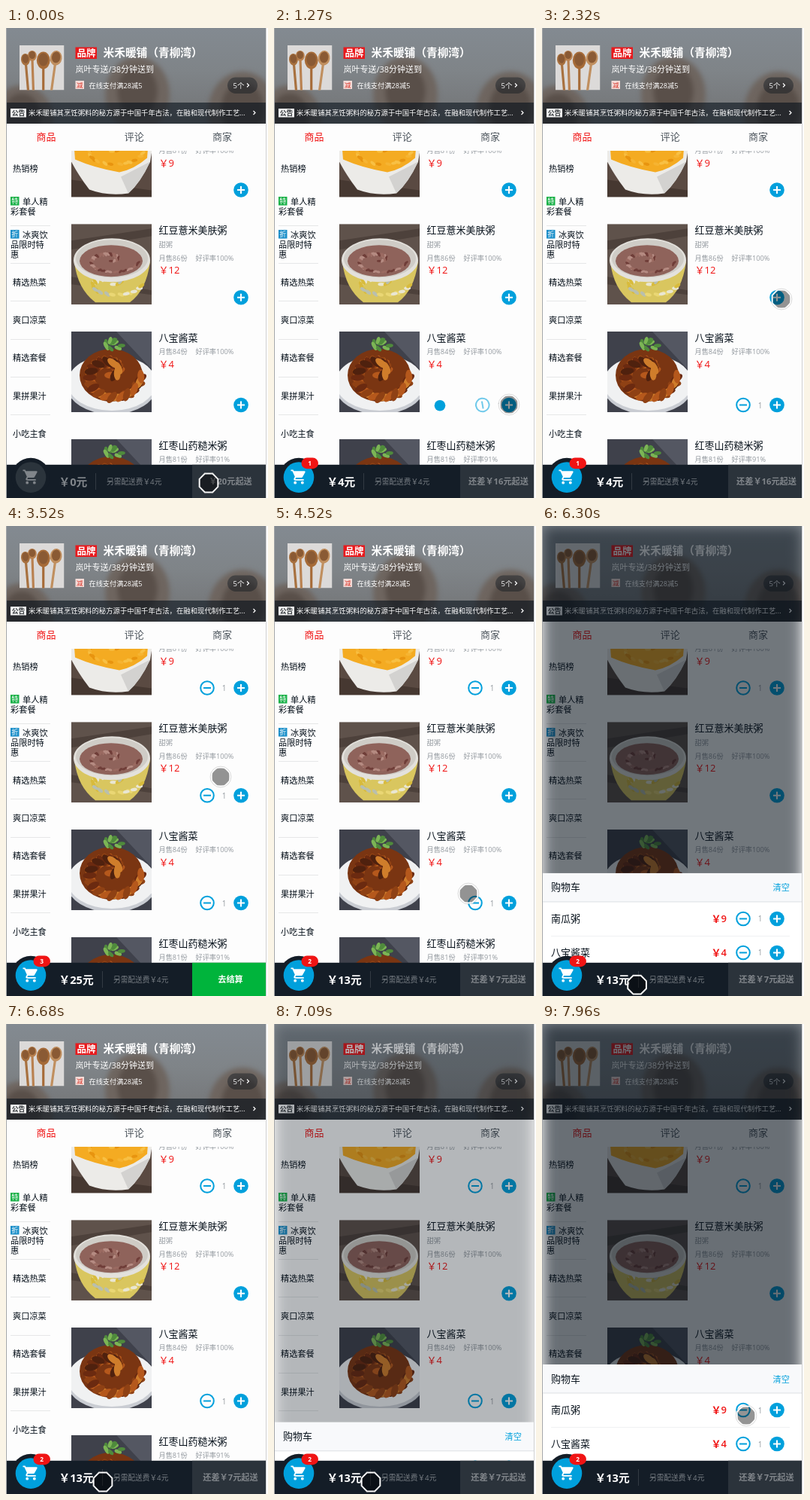
An HTML page for the animation above (8 s loop, 349 by 624 pixels).

```html
<!DOCTYPE html>
<html lang="zh-CN">
<head>
<meta charset="utf-8">
<title>点餐</title>
<style>
html, body { margin: 0; width: 100%; height: 100%; overflow: hidden; background: #fff; }
svg { display: block; }
#stage { position: absolute; left: 0; top: 0; }
text { font-family: "Open Sans", "Noto Sans CJK SC", "Noto Sans CJK", sans-serif; white-space: pre; }
#shade { filter: blur(9.2px); }
#glow { filter: blur(3px); }
</style>
</head>
<body>
<svg id="stage" width="349" height="624" viewBox="0 0 349 624"></svg>
<script>
const BLUE = '#00a0dc', RED = '#f01414', INK = '#07111b', GREY = '#93999f', BAR = '#141d27';

// Markup helpers
const text = (x, y, size, fill, str, more = '') =>
  `<text x="${x}" y="${y}" font-size="${size}" fill="${fill}" ${more}>${str}</text>`;
const rect = (x, y, w, h, fill, more = '') =>
  `<rect x="${x}" y="${y}" width="${w}" height="${h}" fill="${fill}" ${more}/>`;
const oval = (x, y, rx, ry, fill, more = '') =>
  `<ellipse cx="${x}" cy="${y}" rx="${rx}" ry="${ry}" fill="${fill}" ${more}/>`;
const path = (d, fill, more = '') => `<path d="${d}" fill="${fill}" ${more}/>`;
const BOLD = 'font-weight="700" ', MEDIUM = 'font-weight="500" ', MID = 'text-anchor="middle" ';

const chevron = (x, y) => path(`M${x} ${y - 2.5}l2.5 2.5l-2.5 2.5`, 'none', 'stroke="#fff" stroke-width="1.2"');
const plus = y => oval(313, y, 9.8, 9.8, BLUE) +
  path(`M308 ${y}h10M313 ${y - 5}v10`, 'none', 'stroke="#fff" stroke-width="2"');
const minus = `<g class="minus">${oval(0, 0, 8.8, 8.8, 'none', `stroke="${BLUE}" stroke-width="2"`)}${
  path('M-5 0h10', 'none', `stroke="${BLUE}" stroke-width="2"`)}</g>`;
const stepper = (y, id = '') => `<g id="${id}"><g transform="translate(268 ${y})">${minus}</g>${
  text(290.5, y + 4, 10, GREY, '1', MID)}</g>` + plus(y);

// Even, shuffled scatter of small ovals
const scatter = (n, cx, cy, rx, ry, size, colors) => Array.from({ length: n }, (_, i) => {
  const a = i * 2.4, r = Math.sqrt(i * .618 % 1);
  const x = cx + rx * r * Math.cos(a), y = cy + ry * r * Math.sin(a);
  return oval(x, y, size, size * .5, colors[i % colors.length],
    `transform="rotate(${i * 67 % 180} ${x} ${y})"`);
}).join('');

const photos = {
  pumpkin: rect(0, 0, 107, 107, '#5a4a42') + path('M0 84L107 98V107H0Z', '#463831') +
    path('M-2 30H110L105 60Q92 88 76 102Q48 106 24 97Q8 76 -2 56Z', '#ecebe8') +
    path('M76 102Q92 88 105 60L66 80Z', '#d3d2d0') +
    path('M3 30H103L101 55Q84 70 64 74Q30 68 5 57Z', '#f4ab22') +
    scatter(26, 54, 46, 42, 20, 4, ['#f8c044', '#e8940f', '#f6b432']),
  bean: rect(0, 0, 107, 107, '#5f524b') + path('M0 22L107 6V16L0 34ZM0 70L107 88V94L0 80Z', '#4d413b') +
    path('M4 50Q8 86 32 104H78Q100 88 105 50Z', '#d9c65f') +
    scatter(26, 56, 80, 38, 16, 4.5, ['#e9e6d2', '#d8bb3c', '#b9bfae', '#ead774']) +
    oval(54, 48, 51, 29, '#e3e1dc') + oval(54, 46, 48, 25, '#cfccc6') + oval(53, 49, 42, 21, '#8f635b') +
    scatter(50, 53, 49, 37, 17, 3, ['#6f3d38', '#b58b82', '#9a6a61']),
  pickle: rect(0, 0, 107, 107, '#3f414b') + path('M60 0H107V50Z', '#545762') +
    oval(54, 72, 60, 38, '#c9ccd2') + oval(54, 68, 59, 37, '#f0f1f2') +
    oval(53, 58, 42, 35, '#7a3512') +
    scatter(60, 53, 58, 40, 34, 9, ['#b5581c', '#6b2a10', '#cf7d2b', '#8f4114', '#4f210e']) +
    scatter(11, 55, 16, 13, 8, 5, ['#4f8a3c', '#7cb555'])
};
const photo = (x, y, name) =>
  `<svg x="${x}" y="${y}" width="107" height="107" viewBox="0 0 107 107">${photos[name]}</svg>`;

const foods = [
  { y: 117.5, name: '南瓜粥', sold: 81, rate: 100, price: 9, pic: 'pumpkin', desc: '甜粥' },
  { y: 260.2, name: '红豆薏米美肤粥', sold: 86, rate: 100, price: 12, pic: 'bean', desc: '甜粥' },
  { y: 403, name: '八宝酱菜', sold: 84, rate: 100, price: 4, pic: 'pickle' },
  { y: 545.8, name: '红枣山药糙米粥', sold: 81, rate: 91, price: 10, pic: 'pickle' }
];
const stepY = i => foods[i].y + 97.5;

const food = (f, i) => {
  const low = f.desc ? 18.4 : 0;
  return photo(87, f.y, f.pic) + text(203.5, f.y + 12.8, 13, INK, f.name) +
    (f.desc ? text(203.5, f.y + 31, 9.2, GREY, f.desc) : '') +
    text(203.5, f.y + 30 + low, 9.2, GREY, `月售${f.sold}份`) +
    text(252.5, f.y + 30 + low, 9.2, GREY, `好评率${f.rate}%`) +
    text(203.5, f.y + 47.8 + low, 13, RED, '￥' + f.price) + stepper(stepY(i), 'step' + i);
};

const spoon = (x, y, rx, ry, c, tilt) =>
  `<g transform="rotate(${tilt} ${x} ${y})">${rect(x - 1.6, y, 3.2, 60, c)}${oval(x, y, rx, ry, c)}${
    oval(x, y - 1, rx * .72, ry * .75, '#8a5a34')}</g>`;

const glow = (x, y, rx, ry) => oval(x, y, rx, ry, '#6e655f') + oval(x, y - 4, rx * .62, ry * .68, '#594f49');

const header = rect(1, 0, 345, 127, 'url(#sky)') +
  `<svg x="1" y="0" width="345" height="127"><g id="glow">${
    glow(20, 122, 42, 46)}${glow(174, 88, 43, 50)}${glow(314, 112, 46, 54)}</g></svg>` +
  `<svg x="18" y="23" width="59.5" height="59.5" viewBox="0 0 60 60">${rect(0, 0, 60, 60, '#dcdad9')}${
    spoon(17, 14, 6, 7, '#b98150', -2)}${spoon(8, 19, 6, 8, '#a8713f', -5)}${
    spoon(49, 17, 8, 10, '#c08f5f', 8)}${spoon(32, 20, 9, 11.5, '#a66b38', 0)}</svg>` +
  rect(92.5, 25.5, 28.5, 15.5, '#e8191c') + text(107, 38, 12.5, '#fff', '品牌', BOLD + MID) +
  text(129.5, 38.3, 14.7, '#fff', '米禾暖铺（青柳湾）', BOLD) +
  text(92.5, 59, 11, '#fff', '岚叶专送/38分钟送到', MEDIUM) +
  rect(92.5, 70, 11.5, 11, '#f4dcd8') + text(98.2, 79, 8.5, '#d8392e', '减', MID) +
  text(110.5, 80, 9.2, '#fff', '在线支付满28减5', MEDIUM) +
  rect(295, 65.5, 40, 21.5, 'rgba(7,17,27,.4)', 'rx="10.7"') +
  text(302.5, 79.5, 9.6, '#fff', '5个', MEDIUM) + chevron(321, 76) +
  rect(1, 99, 345, 28, 'rgba(7,17,27,.6)') +
  rect(6, 107, 21, 11.5, '#f2f2f2') + text(16.5, 116, 8.8, '#33373b', '公告', BOLD + MID) +
  text(30, 116, 9.4, '#fff', '米禾暖铺其烹饪粥料的秘方源于中国千年古法，在融和现代制作工艺…', MEDIUM) + chevron(329.5, 112.5);

const tabs = ['商品', '评论', '商家'].map((s, i) =>
  text(53.5 + i * 117.3, 149.2, 13, i ? '#4d555d' : RED, s, MID)).join('');

const tag = (y, fill, s) => rect(6, y, 11.5, 11.5, fill) + text(11.7, y + 9.2, 9, '#fff', s, MID);
const menu = text(9, 191, 11.2, INK, '热销榜') +
  tag(224, '#1bb24a', '特') + text(22, 235, 11.2, INK, '单人精') + text(6, 248, 11.2, INK, '彩套餐') +
  tag(268, '#1b8fc9', '折') + text(22, 279, 11.2, INK, '冰爽饮') + text(6, 292, 11.2, INK, '品限时特') + text(6, 305, 11.2, INK, '惠') +
  ['精选热菜', '爽口凉菜', '精选套餐', '果拼果汁', '小吃主食'].map((s, i) =>
    text(9, 342 + i * 50.2, 11.2, INK, s)).join('') +
  [0, 1, 2, 3, 4, 5].map(i => rect(6, Math.round(262 + i * 50.2), 53, 1, '#e6e7e8')).join('');

const row = (f, y) => text(12, y + 4.5, 13, INK, f.name) +
  text(246, y + 4.5, 13, RED, '￥' + f.price, 'text-anchor="end" font-weight="600"') + stepper(y);
const sheet = rect(1, 452, 345, 140, '#fff') + rect(1, 452, 345, 38, '#f8f9fb') + rect(1, 489.5, 345, 1, '#dde0e3') +
  text(12, 475.5, 13, INK, '购物车') + text(330, 475.5, 11.2, BLUE, '清空', 'text-anchor="end"') +
  row(foods[0], 512.5) + rect(12, 535, 318, 1, '#f0f1f2') + row(foods[2], 557.5);

const cartIcon = 'M7 18a2 2 0 1 0 0 4 2 2 0 0 0 0-4zM1 2v2h2l3.6 7.6-1.35 2.4C4.5 15.4 5.5 17 7 17h12v-2H7.4l-.2-.4.9-1.6h7.45c.75 0 1.41-.4 1.75-1l3.6-6.5A1 1 0 0 0 20 4H5.2l-.94-2zM17 18a2 2 0 1 0 0 4 2 2 0 0 0 0-4z';
const bar = rect(1, 579.8, 345, 44.2, BAR) + rect(248, 579.8, 98, 44.2, '#2b333b', 'id="pay"') +
  oval(33, 596.6, 25.8, 25.8, BAR) + oval(33, 596.6, 20.3, 20.3, '#2b343c', 'id="disc"') +
  `<g transform="translate(21.5 584.5) scale(.96)">${path(cartIcon, '#fff', 'id="icon"')}</g>` +
  `<g id="badge">${rect(36.5, 570.5, 22.5, 14.7, RED, 'rx="7.4"')}${text(47.6, 581, 8.4, '#fff', '', BOLD + MID + 'id="num"')}</g>` +
  text(70.5, 608, 14.7, '#fff', '', BOLD + 'id="sum"') +
  `<g id="fee">${rect(119, 591, 1, 22, '#323a43')}${text(134, 606, 9.7, '#787e84', '另需配送费￥4元', MEDIUM)}</g>` +
  text(299, 606, 11.2, '#80858a', '', BOLD + MID + 'id="ask"');

const octagon = r => Array.from({ length: 8 }, (_, i) => {
  const a = (i + .5) * Math.PI / 4;
  return `${(r * Math.cos(a)).toFixed(2)},${(r * Math.sin(a)).toFixed(2)}`;
}).join(' ');
const pointer = `<g id="pointer">${oval(0, 0, 12, 12, 'rgba(0,0,0,.42)')}<polygon points="${octagon(13.4)}" fill="none" stroke="#fff" stroke-width="2"/>${
  oval(0, 0, 13.9, 13.9, 'none', 'stroke="rgba(0,0,0,.25)" stroke-width=".6"')}</g>`;

document.getElementById('stage').innerHTML = `
<defs>
  <linearGradient id="sky" x1="0" y1="0" x2="0" y2="1">
    <stop offset="0" stop-color="#838a91"/><stop offset=".45" stop-color="#7f8488"/>
    <stop offset="1" stop-color="#727375"/>
  </linearGradient>
  <clipPath id="list"><rect x="1" y="163" width="345" height="417"/></clipPath>
  <clipPath id="page"><rect x="1" y="0" width="345" height="624"/></clipPath>
</defs>
${rect(0, 0, 349, 624, '#fdfdfd')}
<g clip-path="url(#list)">${menu}${foods.map(food).join('')}</g>
${header}${tabs}
<g clip-path="url(#page)">${rect(1, 0, 345, 624, INK, 'id="shade"')}</g>
<g id="sheet">${sheet}</g>
${bar}
${oval(0, 0, 7.3, 7.3, BLUE, 'id="ball"')}
${rect(0, 0, 1, 624, '#a5a7a9')}${rect(346, 0, 1, 624, '#cfd0d1')}
${pointer}`;

const $ = id => document.getElementById(id);
const set = (id, attrs) => { for (const k in attrs) $(id).setAttribute(k, attrs[k]); };

// Bursts of screen updates: start, end, count
const bursts = [[150, 840, 6], [1270, 2200, 8], [2320, 3360, 9], [3520, 3940, 4],
  [4210, 5180, 8], [5330, 5600, 3], [6000, 6680, 6], [6960, 7960, 8]];
const ticks = bursts.flatMap(([a, b, n]) => Array.from({ length: n }, (_, i) => a + i * (b - a) / (n - 1)));

const moves = [[0, 270, 604], [150, 268, 602], [290, 257, 591], [840, 313, 500], [1669, 313, 500],
  [2200, 313, 358], [2320, 319, 360], [2710, 317, 360], [2970, 313, 217], [3360, 311, 219],
  [3520, 286, 333], [3940, 268, 358], [4349, 268, 358], [4487, 259, 488], [4764, 165, 592],
  [5180, 129, 606], [5600, 125, 610], [6000, 125, 610], [6680, 129, 608], [7389, 129, 608],
  [7817, 262, 530], [7960, 272, 520]];
const folds = [[0, 0], [5990, 0], [6000, .5], [6136, .87], [6272, .93], [6408, .4], [6544, .08], [6680, 0],
  [6950, 0], [6960, .4], [7103, .82], [7246, .96], [7389, 1]];
const taps = [{ t: 1140, i: 2, n: 1 }, { t: 2350, i: 1, n: 1 }, { t: 2990, i: 0, n: 1 }, { t: 4090, i: 1, n: 0 }];

// Linear interpolation between keys of the form [time, ...values]
function at(keys, t) {
  const j = keys.findIndex(k => k[0] > t);
  if (j < 0) return keys[keys.length - 1].slice(1);
  const a = keys[j - 1], b = keys[j], p = (t - a[0]) / (b[0] - a[0]);
  return a.slice(1).map((v, i) => v + (b[i + 1] - v) * p);
}

function draw(now) {
  const t = ticks.reduce((q, v) => v <= now + .01 ? v : q, 0);
  const has = [0, 0, 0, 0], show = [0, 0, 0, 0];
  let ball = null;
  for (const tap of taps) {
    if (t < tap.t) break;
    const p = Math.min(1, (t - tap.t) / 390), e = 1 - (1 - p) ** 2;
    has[tap.i] = tap.n;
    show[tap.i] = tap.n ? e : 1 - e;
    if (tap.n && p < 1) {
      const y = stepY(tap.i);
      ball = [313 - 276 * p, y + (597 - y) * p * p * (1.4 * p - .4)];
    }
  }
  show.forEach((s, i) => {
    set('step' + i, { opacity: s, transform: `translate(${22 * (1 - s)} 0)` });
    $('step' + i).querySelector('.minus').setAttribute('transform', `rotate(${180 * (1 - s)})`);
  });
  set('ball', { visibility: ball ? 'visible' : 'hidden', transform: `translate(${ball || '0 0'})` });

  const count = has.reduce((a, b) => a + b);
  const sum = foods.reduce((s, f, i) => s + f.price * has[i], 0);
  const ready = sum >= 20;
  $('num').textContent = count;
  $('sum').textContent = `￥${sum}元`;
  $('ask').textContent = ready ? '去结算' : sum ? `还差￥${20 - sum}元起送` : '￥20元起送';
  set('badge', { visibility: count ? 'visible' : 'hidden' });
  set('disc', { fill: count ? BLUE : '#2b343c' });
  set('icon', { fill: count ? '#fff' : '#80858a' });
  set('sum', { fill: count ? '#fff' : '#80858a' });
  set('fee', { transform: `translate(${sum > 9 ? 9 : 0} 0)` });
  set('pay', { fill: ready ? '#00b43c' : '#2b333b' });
  set('ask', { fill: ready ? '#fff' : '#80858a' });

  const [open] = at(folds, t);
  set('shade', { opacity: .6 * open ** .8 });
  set('sheet', { transform: `translate(0 ${128 * (1 - open)})`, visibility: open ? 'visible' : 'hidden' });
  set('pointer', { transform: `translate(${at(moves, t)})` });
}

function loop() {
  draw(performance.now() % 8000);
  requestAnimationFrame(loop);
}
loop();
</script>
</body>
</html>
```
